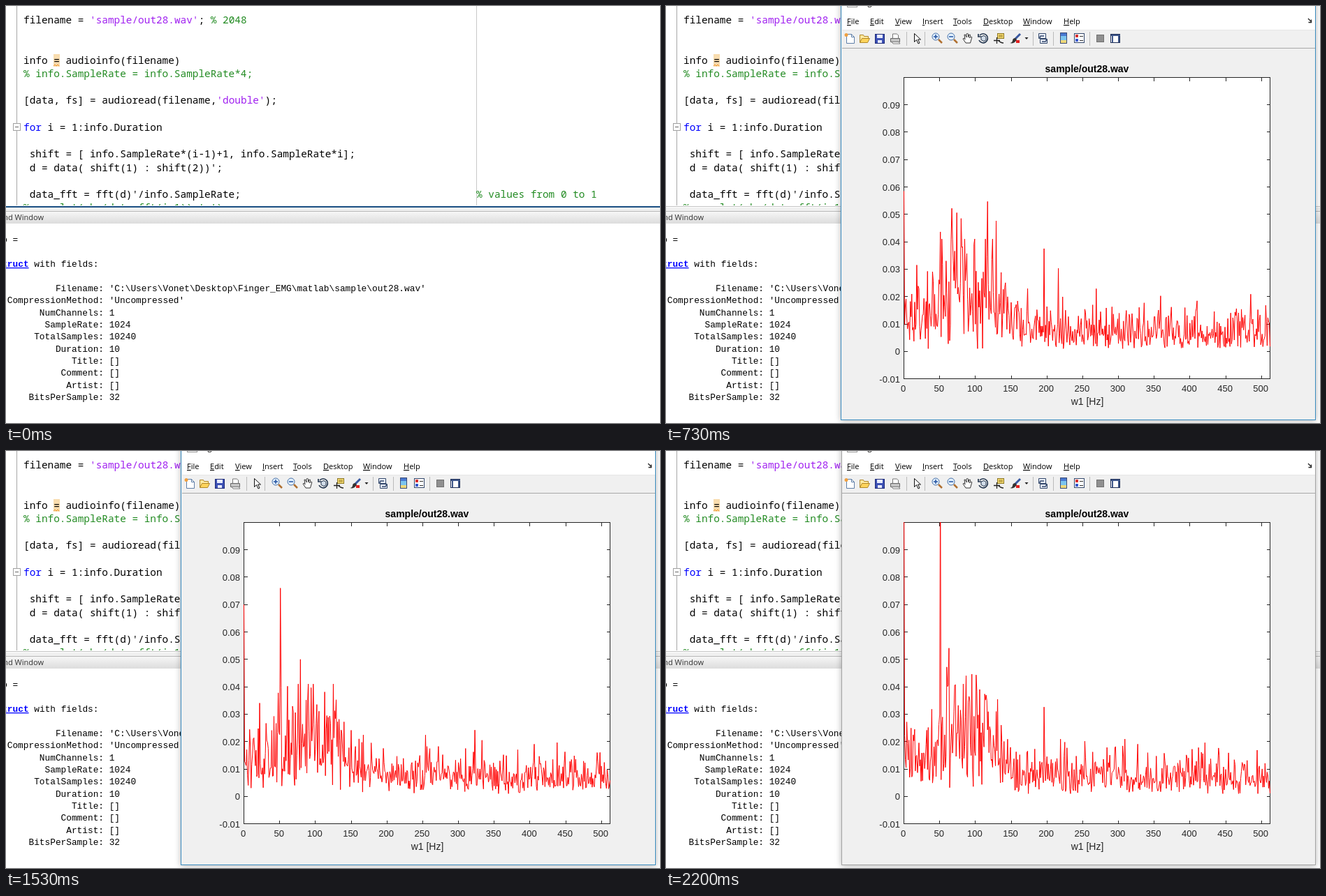
These frames come from a looping animation (936x598 px, 2740 ms). An HTML page:

```html
<!DOCTYPE html>
<html lang="en">
<head>
<meta charset="utf-8">
<title>Spectrum plot</title>
<style>
html, body { margin: 0; width: 100%; height: 100%; overflow: hidden; background: #fff; }
svg { display: block; width: 936px; height: 598px; }
text { white-space: pre; }
.code { font: 14.4px "Noto Sans Mono", monospace; }
.out { font: 12.8px "Liberation Mono", monospace; }
.ui { font: 11px "Open Sans", sans-serif; }
.tick { font: 13px "Liberation Sans", sans-serif; fill: #262626; }
.axis { font: 14px "Liberation Sans", sans-serif; fill: #262626; }
.title { font: bold 14px "Liberation Sans", sans-serif; }
.crisp { shape-rendering: crispEdges; }
#frame { filter: drop-shadow(0 1px 4px rgba(0, 0, 0, .3)); }
</style>
</head>
<body>
<svg viewBox="0 0 936 598">
  <defs>
    <linearGradient id="bar" x2="0" y2="1">
      <stop stop-color="#f8f8f8"/><stop offset="1" stop-color="#dcdcdc"/>
    </linearGradient>
    <clipPath id="editor"><rect width="936" height="286"/></clipPath>
    <clipPath id="axes"><rect x="340" y="102" width="525" height="433"/></clipPath>
  </defs>
  <rect width="936" height="598" fill="#fff"/>

  <g clip-path="url(#editor)">
    <path class="crisp" d="M15.5 0V287" stroke="#a8a8a8"/>
    <path class="crisp" d="M673.5 0V287" stroke="#c8c8c8"/>
    <rect class="crisp" x="10.5" y="168.5" width="10" height="10" fill="#fff" stroke="#a0a0a0"/>
    <path class="crisp" d="M13 173.5h5" stroke="#666"/>
    <rect x="68" y="69" width="9" height="18" fill="#f8dcae"/>
    <path d="M68 86l2-2 2 2 2-2 2 2" fill="none" stroke="#f09020"/>
    <g id="code" class="code"></g>
  </g>

  <rect y="289" width="936" height="5" fill="#f0f0f0"/>
  <rect y="294" width="936" height="18" fill="url(#bar)"/>
  <path class="crisp" d="M0 294.5H936" stroke="#b8b8b8"/>
  <rect id="split" class="crisp" y="287" width="936" height="2"/>
  <text class="ui" x="54" y="307" text-anchor="end" fill="#333">Command Window</text>
  <g id="out" class="out"></g>

  <g id="win">
    <rect id="frame" class="crisp" y="-9.5" height="603" fill="#f0f0f0"/>
    <g id="tools">
      <rect x="252" width="677" height="34" fill="#fff"/>
      <path class="crisp" d="M252 34.5h677" stroke="#e6e6e6"/>
      <path class="crisp" d="M252 60.5h677" stroke="#a8a8a8"/>
      <rect x="259.5" y="-8" width="14" height="9.5" fill="#fff" stroke="#999"/>
      <text class="ui" x="280" y="-1">Figure 1</text>
      <g id="menu" class="ui"></g>
      <path d="M919 18l4 4M923.5 19.5v4h-4" fill="none" stroke="#222" stroke-width="1.3"/>
      <path class="crisp" d="M344.5 37v20M370.5 37v20M525.5 37v20M554.5 37v20M606.5 37v20" stroke="#bbb"/>

      <path d="M258.5 40.5h7l4 4v9h-11z" fill="#fff" stroke="#5f7fa8"/>
      <path d="M265.5 40.5v4h4" fill="none" stroke="#5f7fa8"/>
      <circle cx="258" cy="41.5" r="2.5" fill="#f0a040"/>
      <path d="M277.5 52.5v-11h5l1 2h6v3" fill="#ffe9a0" stroke="#b08828"/>
      <path d="M277.5 52.5l3-6h11l-3 6z" fill="#ffd45c" stroke="#b08828"/>
      <rect x="299.5" y="40.5" width="13" height="13" fill="#3c50b4" stroke="#202c78"/>
      <path d="M302 41h8v5h-8zM303 49h6v4h-6z" fill="#e8ecff"/>
      <path d="M324.5 46v-6h6l2 2v4" fill="#fff" stroke="#777"/>
      <path d="M321.5 46.5h13v5h-13z" fill="#c4c4c4" stroke="#666"/>
      <path d="M323 51.5h10l2 2.5h-10z" fill="#fff" stroke="#777"/>
      <path d="M355.5 39.5v12l3-3 2.5 5.5 2-1-2.5-5h4z" fill="#fff" stroke="#111"/>
      <g id="zoom"></g>
      <path d="M429 53l-4-6q1-2 3 1l-1-7q2-1 3 4v-5q2-1 2.5 0v5l1.5-4q2 0 1.5 1l-1 4 2-2q2 0 1 2l-2 7z" fill="#fff" stroke="#333"/>
      <path d="M449 42a6.5 6.5 0 1 1-1 7M447 40v4h4" fill="none" stroke="#24364f" stroke-width="1.7"/>
      <path d="M451 44l4-1.5 3 2v4l-3 2-4-2z" fill="#d4deea" stroke="#24364f"/>
      <rect x="474.5" y="39.5" width="9" height="7" fill="#ffe27a" stroke="#8a7420"/>
      <path d="M476 42h6M476 44h6" stroke="#8a7420"/>
      <path d="M469 49.5h9M473.5 45v9M475 49q4 4 8 4" fill="none" stroke="#222" stroke-width="1.3"/>
      <path d="M507 40l-7 7" stroke="#3858a0" stroke-width="3"/>
      <path d="M500 46q-4 0-4 4-1 3-4 3 7 2 10-5z" fill="#333"/>
      <rect x="501" y="49" width="5" height="4" fill="#e02020"/>
      <path d="M513.5 45h5l-2.5 3z" fill="#222"/>
      <path d="M533.5 39.5h10v7h-10zM535.5 47.5h10v6h-10z" fill="#e8eef8" stroke="#34486c"/>
      <path d="M536 47a3 3 0 0 1 0-4h5M543 46a3 3 0 0 1 0 5h-5" fill="none" stroke="#34486c" stroke-width="1.5"/>
      <g class="crisp">
        <rect x="564.5" y="38.5" width="9" height="15" fill="#7cc4ee" stroke="#3c4c78"/>
        <path d="M565 39h8v4h-8z" fill="#4878d0"/><path d="M565 49h8v4h-8z" fill="#f0d878"/>
        <rect x="584.5" y="39.5" width="14" height="13" fill="#fff" stroke="#34486c"/>
        <path d="M586 41h4v4h-4z" fill="#d83030"/><path d="M586 47h4v4h-4z" fill="#3858d0"/>
        <path d="M592 43.5h5M592 49.5h5" stroke="#333"/>
        <rect x="616.5" y="41.5" width="10" height="10" fill="#909090" stroke="#707070"/>
        <rect x="636.5" y="40.5" width="13" height="12" fill="#fff" stroke="#1f2f58"/>
        <path d="M637 42h13M638.5 43v9M647.5 43v9" stroke="#3c5488" stroke-width="2"/>
      </g>
    </g>
    <g id="plot">
      <rect x="340" y="102" width="525" height="433" fill="#fff"/>
      <path id="grid" class="crisp" fill="none" stroke="#262626"/>
      <g id="ticks" class="tick"></g>
      <path id="curve" fill="none" stroke="#f00" stroke-linejoin="round" clip-path="url(#axes)"/>
      <text class="title" x="602.5" y="95" text-anchor="middle">sample/out28.wav</text>
      <text class="axis" x="603" y="572" text-anchor="middle">w1 [Hz]</text>
    </g>
  </g>
</svg>
<script>
const LOOP = 2740;
const $ = id => document.getElementById(id);

function add(parent, tag, attrs, text = '') {
  const node = document.createElementNS('http://www.w3.org/2000/svg', tag);
  for (const k in attrs) node.setAttribute(k, attrs[k]);
  node.textContent = text;
  return parent.appendChild(node);
}

// Editor: each run is [row, column, text, colour]
const GREEN = '#228b22', PURPLE = '#a020f0';
const runs = [
  [0, 0, 'filename = '], [0, 11, "'sample/out28.wav'", PURPLE], [0, 29, ';'], [0, 31, '% 2048', GREEN],
  [3, 0, 'info = audioinfo(filename)'],
  [4, 0, '% info.SampleRate = info.SampleRate*4;', GREEN],
  [6, 0, '[data, fs] = audioread(filename,'], [6, 32, "'double'", PURPLE], [6, 40, ');'],
  [8, 0, 'for', '#00f'], [8, 4, 'i = 1:info.Duration'],
  [10, 1, 'shift = [ info.SampleRate*(i-1)+1, info.SampleRate*i];'],
  [11, 1, "d = data( shift(1) : shift(2))';"],
  [13, 1, "data_fft = fft(d)'/info.SampleRate;"], [13, 75, '% values from 0 to 1', GREEN],
  [14, 0, "%    plot(abs(data_fft(i,1)),'r')", GREEN]
];
for (const [row, col, text, fill = '#000'] of runs)
  add($('code'), 'text', { x: 25 + col * 8.64, y: 25 + row * 19.23, fill }, text);

// Command output
const out = $('out');
add(out, 'text', { x: -28.9, y: 339 }, 'info =');
add(out, 'text', { x: -13.5, y: 374, fill: '#00f', 'font-weight': 'bold', 'text-decoration': 'underline' }, 'struct');
add(out, 'text', { x: 40.3, y: 374 }, 'with fields:');
Object.entries({
  Filename: "'C:\\Users\\Vonet\\Desktop\\Finger_EMG\\matlab\\sample\\out28.wav'",
  CompressionMethod: "'Uncompressed'",
  NumChannels: 1, SampleRate: 1024, TotalSamples: 10240, Duration: 10,
  Title: '[]', Comment: '[]', Artist: '[]', BitsPerSample: 32
}).forEach(([key, value], i) => {
  const y = 409 + i * 17.33;
  add(out, 'text', { x: 140, y, 'text-anchor': 'end' }, key + ':');
  add(out, 'text', { x: 147.7, y }, value);
});

// Menu with underlined access keys
const menu = { File: 259, Edit: 292, View: 328, Insert: 367, Tools: 411, Desktop: 454, Window: 511, Help: 569 };
for (const name in menu) {
  const item = add($('menu'), 'text', { x: menu[name], y: 26 });
  add(item, 'tspan', { 'text-decoration': 'underline' }, name[0]);
  add(item, 'tspan', {}, name.slice(1));
}

for (const [x, sign] of [[386, 'M383 44h6M386 41v6'], [408, 'M405 44h6']]) {
  add($('zoom'), 'path', { d: `M${x + 4} 48l5 5`, stroke: '#b07030', 'stroke-width': 2.5 });
  add($('zoom'), 'circle', { cx: x, cy: 44, r: 5, fill: '#e4f2ff', stroke: '#4870a8' });
  add($('zoom'), 'path', { d: sign, stroke: '#2050a0', 'stroke-width': 1.5 });
}

// Axes
const px = hz => 340.5 + hz * 1.0234;
const py = v => 495.3 - v * 3930;
let grid = 'M340.5 102.5H864.5V534.5H340.5Z';
for (let hz = 0; hz <= 500; hz += 50) {
  const x = px(hz);
  grid += `M${x} 534.5v-5M${x} 102.5v5`;
  add($('ticks'), 'text', { x: x - 1, y: 553, 'text-anchor': 'middle' }, hz);
}
for (let n = -1; n < 10; n++) {
  const y = py(n / 100);
  grid += `M340.5 ${y}h5M864.5 ${y}h-5`;
  add($('ticks'), 'text', { x: 335, y: y + 5, 'text-anchor': 'end' }, n / 100);
}
$('grid').setAttribute('d', grid);

// Main peaks of each second: Hz, height in 1e-4
const peaks = [
  [0, 660, 37, 455, 63, 472, 73, 712, 83, 430, 104, 614, 107, 496, 126, 420, 151, 357, 251, 284],
  [0, 585, 18, 315, 51, 436, 67, 522, 74, 506, 80, 485, 117, 547, 129, 476, 196, 375, 216, 303],
  [0, 560, 51, 640, 88, 510],
  [0, 542, 51, 848, 85, 601, 66, 412, 101, 488, 107, 527, 132, 410, 213, 313, 415, 226],
  [0, 604, 51, 862, 54, 552, 69, 540, 82, 520, 98, 456, 116, 395, 141, 537],
  [0, 700, 51, 760, 79, 500],
  [0, 900, 51, 804, 61, 466, 66, 595, 69, 500, 88, 422, 103, 452, 114, 411],
  [0, 820, 51, 780, 92, 490],
  [0, 950, 51, 900, 72, 510],
  [0, 1150, 39, 318, 51, 1180, 60, 472, 63, 541, 87, 440, 95, 446, 101, 443, 196, 326]
];

function rng(seed) {
  return () => {
    seed = seed + 0x6D2B79F5 | 0;
    let r = Math.imul(seed ^ seed >>> 15, 1 | seed);
    r = r + Math.imul(r ^ r >>> 7, 61 | r) ^ r;
    return ((r ^ r >>> 14) >>> 0) / 4294967296;
  };
}

// Rayleigh noise under a muscle-signal envelope, with the peaks on top
function spectrum(list, index) {
  const rand = rng(index * 97 + 11), amp = [];
  for (let f = 0; f <= 512; f++) {
    const band = Math.exp(-(((f - 92) / 52) ** 4));
    const mean = .0068 + .006 * Math.exp(-f / 180) + .0125 * band;
    const noise = mean * 1.13 * Math.sqrt(-Math.log(1 - rand()));
    amp.push(Math.min(.041, Math.max(.001, noise)));
  }
  for (let i = 0; i < list.length; i += 2) amp[list[i]] = list[i + 1] / 1e4;
  return 'M' + amp.map((v, f) => px(f).toFixed(2) + ' ' + py(v).toFixed(2)).join('L');
}
const curves = peaks.map(spectrum);

function show(id, on) { $(id).style.display = on ? '' : 'none'; }

function draw(now) {
  const t = now % LOOP;
  const open = t >= 270;
  const active = t < 530 || (t >= 730 && t < 2000 && (t - 730) % 200 < 70);
  const left = active ? 250.5 : 251.5;
  const second = t < 600 ? 0 : Math.min(9, Math.floor((t - 400) / 200));
  show('win', open);
  show('tools', t >= 330);
  show('plot', t >= 470);
  $('split').setAttribute('fill', open ? '#c4c4c4' : '#1b4f83');
  $('split').setAttribute('height', open ? 1 : 2);
  $('frame').setAttribute('x', left);
  $('frame').setAttribute('width', 929.5 - left);
  $('frame').setAttribute('stroke', active ? '#3a8cc0' : '#a4a4a4');
  $('curve').setAttribute('d', curves[second]);
  requestAnimationFrame(() => draw(performance.now() - start));
}
const start = performance.now();
draw(0);
</script>
</body>
</html>
```
